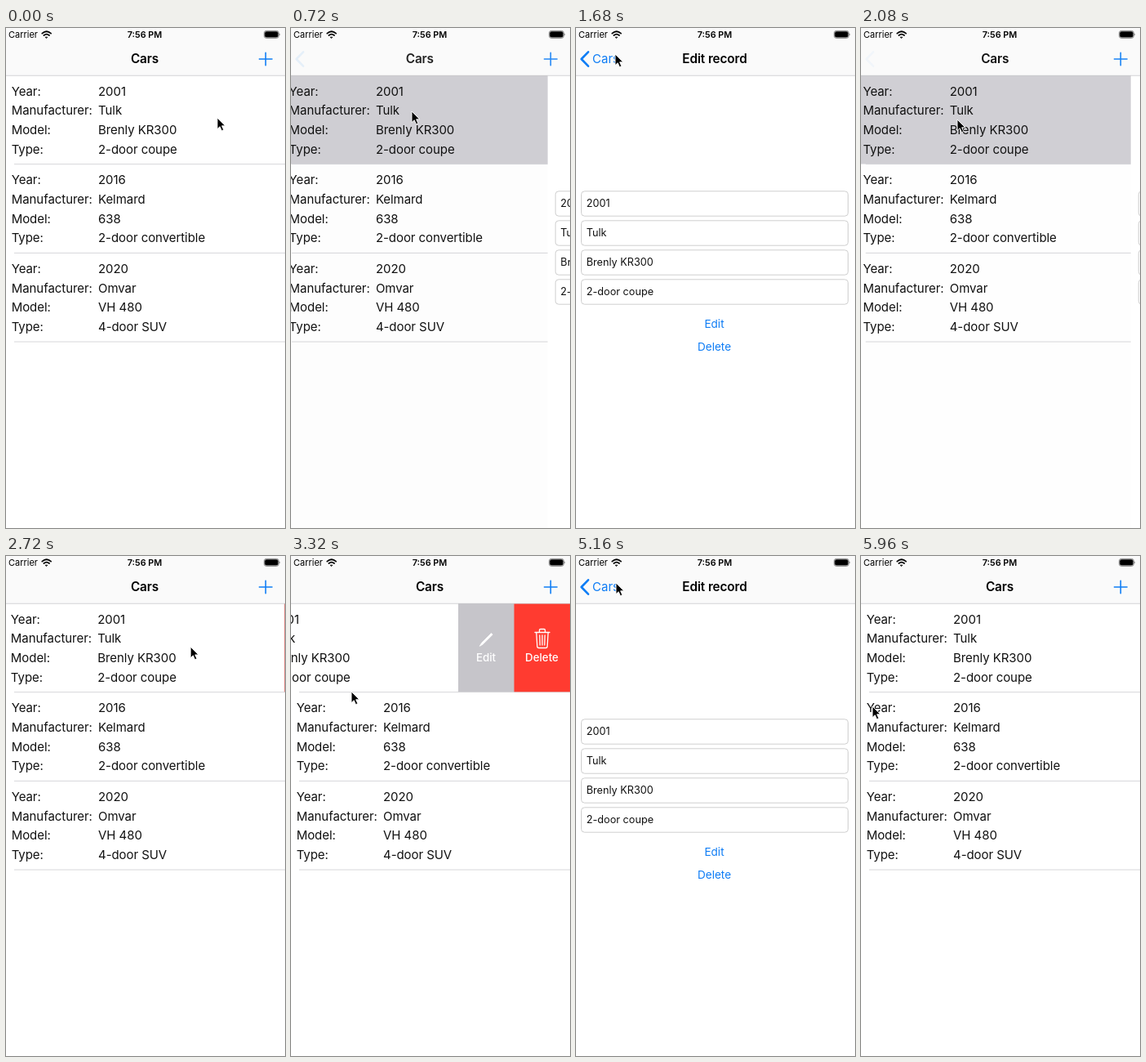
An HTML page that plays this animation: 342 px wide and 612 px high, repeating every 6 s.

```html
<!DOCTYPE html>
<html lang="en">
<head>
<meta charset="utf-8">
<title>Cars</title>
<style>
  html, body { margin: 0; width: 100%; height: 100%; overflow: hidden; background: #fff; }
  svg { display: block; width: 342px; height: 612px; font-family: Inter, Roboto, sans-serif; }
  .row text { font-size: 15px; letter-spacing: -.06px; fill: #111; }
  .title { font-size: 15.3px; font-weight: 600; letter-spacing: -.1px; text-anchor: middle; }
  .status { font-size: 11px; }
  .input { font-size: 12.7px; fill: #111; }
  .link { font-size: 13.6px; fill: #0f7df5; text-anchor: middle; }
  .action { font-size: 13.3px; font-weight: 500; fill: #fff; text-anchor: middle; }
  .line { fill: none; stroke-linecap: round; stroke-linejoin: round; }
</style>
</head>
<body>
<svg viewBox="0 0 342 612">
  <rect width="342" height="612" fill="#fff"/>
  <g id="list">
    <rect width="345" height="612" fill="#fff"/>
    <rect id="highlight" y="58" width="345" height="108.5" fill="#d1d0d5"/>
    <g id="rows"></g>
    <g id="editAction">
      <rect y="58" width="140" height="108.3" fill="#c6c5ca"/>
      <path class="line" d="M26.5 110l2.2-3.6L40.5 94.6l1.6 1.6L30.2 108z" stroke="#fff" stroke-width=".9" style="fill:#fff"/>
      <text class="action" x="34" y="129.3">Edit</text>
    </g>
    <g id="deleteAction">
      <rect y="58" width="140" height="108.3" fill="#ff3b30"/>
      <path class="line" stroke="#fff" stroke-width="1.3"
        d="M25.5 93.5h18M31 93v-2.2q0-1.3 1.3-1.3h4.4q1.3 0 1.3 1.3V93M27.3 93.5l1 17q.1 2 2 2h8.4q1.9 0 2-2l1-17M31.3 97l.4 12M34.5 97v12M37.7 97l-.4 12"/>
      <text class="action" x="34" y="129.3">Delete</text>
    </g>
    <rect id="dim" width="345" height="612" fill="#000"/>
  </g>
  <g id="page">
    <rect x="-3" width="348" height="612" fill="#fff"/>
    <g id="inputs"></g>
    <text class="link" x="169.5" y="367">Edit</text>
    <text class="link" x="169.5" y="395">Delete</text>
  </g>
  <rect width="342" height="58" fill="#fafafa"/>
  <rect y="57.8" width="342" height=".8" fill="#c9c9cb"/>
  <text class="status" x="3" y="12.4">Carrier</text>
  <g class="line" stroke="#000" stroke-width="1.8">
    <path d="M44.3 6.6q5.4-4.6 10.8 0M46.4 9q3.3-2.8 6.6 0"/>
    <path d="M48.6 11.2h2.2l-1.1 1.1z" stroke-width="1"/>
  </g>
  <text class="status" x="170" y="12.4" text-anchor="middle" font-weight="600" style="font-size:10.8px">7:56 PM</text>
  <rect x="316.4" y="3.4" width="18" height="9" rx="2.8" fill="#fff" stroke="#666" stroke-width=".8"/>
  <rect x="317.2" y="4.2" width="16.4" height="7.4" rx="2"/>
  <path d="M335.4 6.2q1.6 1.7 0 3.4z" fill="#666"/>
  <path id="chevron" class="line" d="M15 29.3L6.6 38l8.4 8.7" stroke="#0f7df5" stroke-width="2.6"/>
  <text id="backLabel" x="20" y="43.4" font-size="15" fill="#0f7df5">Cars</text>
  <text id="listTitle" class="title" x="170" y="43.4">Cars</text>
  <text id="editTitle" class="title" x="170" y="43.4">Edit record</text>
  <path id="plus" class="line" d="M310.5 38h15.6M318.3 30.2v15.6" stroke="#0f7df5" stroke-width="1.6"/>
  <path id="cursor" d="M0-1V12.6l3.2-2.9 2.2 5 2.4-1-2.2-4.9h4.2z" fill="#000" stroke="#fff" stroke-width=".9"/>
</svg>
<script>
const LOOP = 6000, STEP = 40, STAGE = 342, SWIPE = 137, ROW_HEIGHT = 108.7;
const SCREEN = 348; // the phone screen reaches 3px past each side of the stage
const $ = id => document.getElementById(id);

const cars = [
  ['2001', 'Tulk', 'Brenly KR300', '2-door coupe'],
  ['2016', 'Kelmard', '638', '2-door convertible'],
  ['2020', 'Omvar', 'VH 480', '4-door SUV']
];
const labels = ['Year:', 'Manufacturer:', 'Model:', 'Type:'];

$('rows').innerHTML = cars.map((car, i) => {
  const top = 58 + i * ROW_HEIGHT;
  const lines = car.map((value, j) => {
    const y = top + 24.6 + j * 23.7;
    return `<text x="6.7" y="${y}">${labels[j]}</text><text x="113" y="${y}">${value}</text>`;
  }).join('');
  return `<g class="row">${lines}</g>
    <rect x="10" y="${top + 108.2}" width="335" height=".9" fill="#d3d3d6"/>`;
}).join('');

$('inputs').innerHTML = cars[0].map((value, i) => {
  const y = 199.8 + i * 36;
  return `<rect x="6.5" y="${y}" width="327" height="30.4" rx="4" fill="#fff" stroke="#cfcfcf"/>
    <text class="input" x="12.7" y="${y + 19.4}">${value}</text>`;
}).join('');

const firstRow = document.querySelector('.row');
const clamp = v => Math.min(1, Math.max(0, v));
const smooth = v => v * v * (3 - 2 * v);
const ramp = (t, from, to) => clamp((t - from) / (to - from));

// Critically damped spring from 0 to 1.
function spring(t, start, rate = 14) {
  const u = Math.max(0, t - start) / 1000 * rate;
  return u > 9 ? 1 : 1 - (1 + u) * Math.exp(-u);
}

// Pointer stops: time, x, y
const stops = [
  [0, 259, 111], [240, 148, 103], [1140, 148, 103], [1560, 48, 33], [1790, 48, 33],
  [2080, 118, 113], [2400, 230, 112], [2680, 230, 112], [3100, 80, 116],
  [3320, 74, 167], [3640, 236, 128], [4400, 236, 128], [5080, 49, 34],
  [5560, 49, 34], [5960, 14, 185]
];

function pointer(t) {
  const next = stops.findIndex(s => s[0] > t);
  if (next < 0) return stops[stops.length - 1].slice(1);
  const [t0, x0, y0] = stops[next - 1], [t1, x1, y1] = stops[next];
  const k = smooth((t - t0) / (t1 - t0));
  return [x0 + (x1 - x0) * k, y0 + (y1 - y0) * k];
}

const move = (el, x, y = 0) => el.setAttribute('transform', `translate(${x.toFixed(2)} ${y.toFixed(2)})`);
const fade = (el, v) => el.setAttribute('opacity', clamp(v).toFixed(3));

function draw(t) {
  const push = t < 3000
    ? spring(t, 685) - spring(t, 1724)
    : spring(t, 4007) - spring(t, 5240);
  const rest = 1 - push;
  const swipe = SWIPE * (smooth(ramp(t, 2700, 3140)) - spring(t, 4007, 7.4));

  move($('list'), -0.3 * SCREEN * push);
  fade($('dim'), 0.1 * push);
  fade($('highlight'), t < 520 ? 0 : 1 - ramp(t, 2200, 2520));
  move(firstRow, -swipe);
  move($('editAction'), STAGE - swipe);
  move($('deleteAction'), STAGE - swipe / 2);

  move($('page'), SCREEN * rest);
  move($('backLabel'), 165 * rest);
  move($('listTitle'), -140 * push);
  move($('editTitle'), 250 * rest);
  fade($('backLabel'), 1.6 * push - 0.5);
  fade($('listTitle'), 1 - 1.6 * push);
  fade($('editTitle'), 1.6 * push - 0.5);
  fade($('chevron'), push);
  fade($('plus'), rest);
  move($('cursor'), ...pointer(t));
}

const began = performance.now();
function tick() {
  const t = (performance.now() - began) % LOOP;
  draw(Math.floor(t / STEP) * STEP);
  requestAnimationFrame(tick);
}
tick();
</script>
</body>
</html>
```
